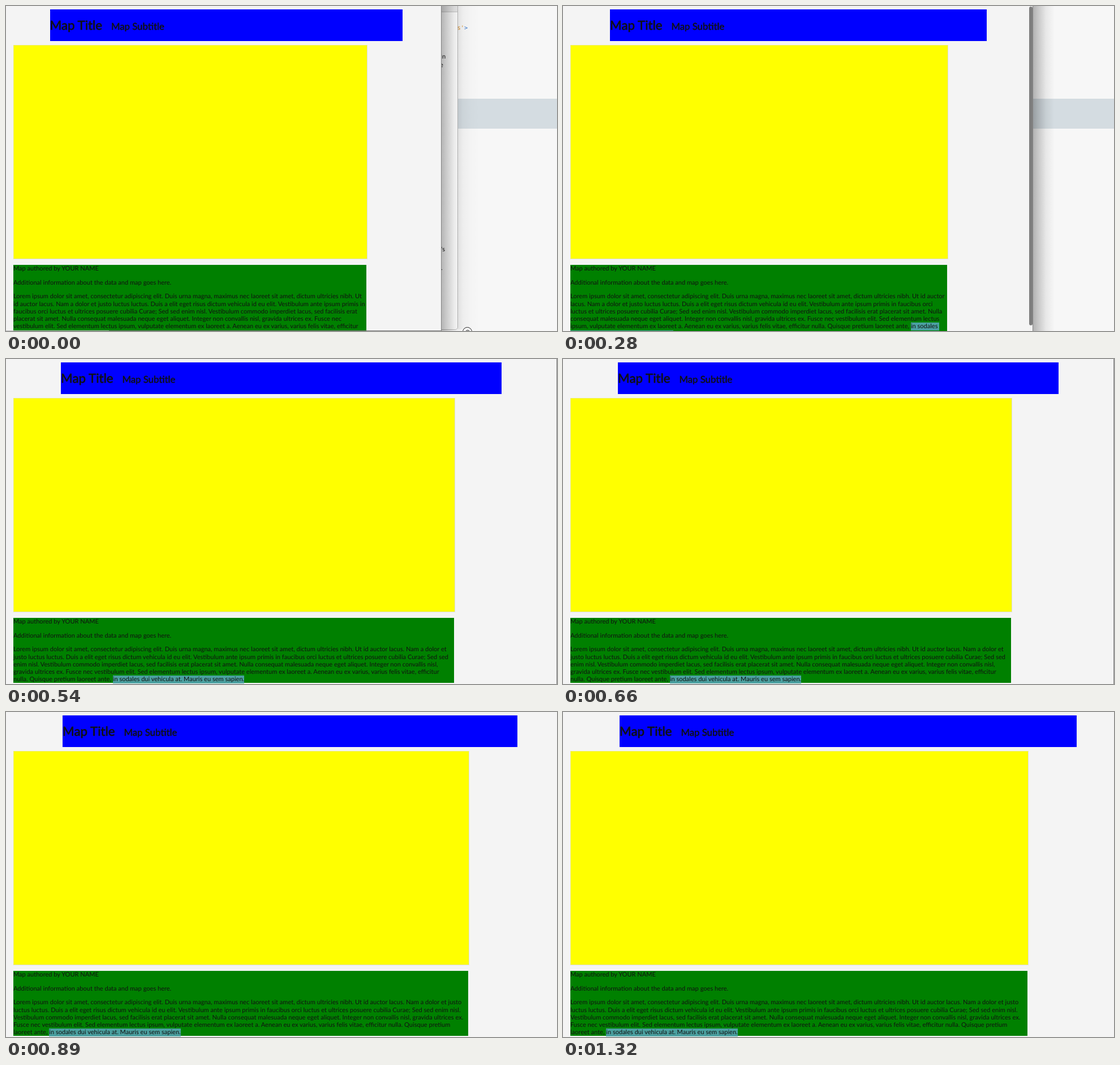
Recreate the animation shown at these times as an HTML page. Size 974x575 px, loop 1500 ms.

```html
<!DOCTYPE html>
<html lang="en">
<head>
<meta charset="utf-8">
<title>Resizing a map page</title>
<style>
html, body { margin: 0; width: 100%; height: 100%; overflow: hidden; }
body { position: relative; background: #f7f7f7; color: #111; font: 11.06px/13.26px Lato, sans-serif; text-rendering: geometricPrecision; }
div { position: absolute; box-sizing: border-box; white-space: pre; }
#stage { left: 0; top: 0; width: 974px; height: 575px; overflow: hidden; }
#row { left: 0; top: 164px; width: 974px; height: 53px; background: #d4dce1; }
#code { left: 797.5px; top: 32px; font: 10.3px/14px "DejaVu Sans Mono", monospace; color: #d98a1c; }
#code b { font-weight: 400; color: #2a6fc9; }
#ring { left: 807px; top: 568px; width: 17px; height: 17px; border: 1.3px solid #222; border-radius: 50%; background: #fff; }
#ring::after { content: ""; position: absolute; left: 4px; top: 4px; width: 6px; height: 6px; border: 1px solid #222; border-radius: 50%; }
.win { left: 0; background: #f4f4f4; border-right: 1px solid #858585; }
.win::after {
  content: ""; position: absolute; left: 100%; top: 0; bottom: 0; width: 38px; margin-left: 1px;
  background: linear-gradient(90deg, #00000047, #0000002b 30%, #00000010 60%, #0000);
}
#back { top: 0; width: 799px; height: 573px; background: #fcfcfc; border-color: #b5b5b5; border-bottom: 1px solid #bbb; border-bottom-right-radius: 5px; }
#back::before { content: ""; position: absolute; left: 0; top: 0; width: 100%; height: 11px; background: #e6e6e6; border-bottom: 1px solid #c4c4c4; box-sizing: border-box; }
#back::after { opacity: .2; }
#back div { line-height: 14px; }
#page { top: 0; height: 575px; }
#bar { right: 0; top: 1px; width: 6px; height: 564px; border-radius: 3px; background: #7e7e7e; }
#head { top: 6px; height: 56px; background: #00f; }
#head div { line-height: 1; -webkit-text-stroke: .029em #111; }
#title { left: 0; top: 17.4px; font-size: 22.34px; }
#sub { left: 108.4px; top: 22.4px; font-size: 16.75px; }
#map { left: 13px; top: 69px; height: 379px; background: #ff0; border: 1px solid #ddd; border-left-color: #eeee66; border-top-color: #eeee66; }
#info { left: 13px; top: 458px; background: green; }
#info div { left: 0; margin-top: .4px; }
#info mark { display: inline-block; height: 13.26px; background: #4aa0a0; color: inherit; }
#foot { left: 0; top: 573.5px; width: 770px; height: 2px; background: linear-gradient(90deg, #bbb 182px, #777 182px); }
</style>
</head>
<body>
<div id="stage">
  <div id="row"></div>
  <div id="code">s'<b>&gt;</b></div>
  <div id="ring"></div>
  <div id="back" class="win">
    <div style="left:768px;top:83px">In</div>
    <div style="left:767px;top:98px">e</div>
    <div style="left:769px;top:424px">'s</div>
    <div style="left:769px;top:457px">.</div>
  </div>
  <div id="page" class="win"><div id="bar"></div></div>
  <div id="head"><div id="title">Map Title</div><div id="sub">Map Subtitle</div></div>
  <div id="map"></div>
  <div id="info"></div>
  <div id="foot"></div>
</div>
<script>
const words = `Lorem ipsum dolor sit amet, consectetur adipiscing elit. Duis urna magna, maximus nec laoreet sit amet, dictum ultricies nibh. Ut id auctor lacus. Nam a dolor et justo luctus luctus. Duis a elit eget risus dictum vehicula id eu elit. Vestibulum ante ipsum primis in faucibus orci luctus et ultrices posuere cubilia Curae; Sed sed enim nisl. Vestibulum commodo imperdiet lacus, sed facilisis erat placerat sit amet. Nulla consequat malesuada neque eget aliquet. Integer non convallis nisl, gravida ultrices ex. Fusce nec vestibulum elit. Sed elementum lectus ipsum, vulputate elementum ex laoreet a. Aenean eu ex varius, varius felis vitae, efficitur nulla. Quisque pretium laoreet ante, in sodales dui vehicula at. Mauris eu sem sapien.`.split(' ');
const marked = words.lastIndexOf('in');
const wide = [28, 57, 80, 104];

// start ms, header left, content width, window edge, word index of each line break
const steps = [
  [0, 77.5, 623.5, 770, [20, 45, 64, 82, 101]],
  [150, 83, 666, 831, [22, 47, 68, 87, 108]],
  [360, 92, 744, 914, [25, 52, 74, 97]],
  [540, 97, 779, 974, [27, 55, 77, 101]],
  [740, 99, 798, 1040, wide],
  [890, 100, 804, 1040, wide],
  [1040, 100, 808, 1040, wide],
];
const loop = 1500, lineH = 13.26, gap = 24.43;
const $ = id => document.getElementById(id);
const put = (id, left, width) => {
  $(id).style.left = left + 'px';
  $(id).style.width = width + 'px';
};
const row = (top, html) => `<div style="top:${top}px">${html}</div>`;

function paragraph(breaks) {
  return [0, ...breaks].map((from, i) => {
    const to = breaks[i] ?? words.length;
    const cut = Math.min(Math.max(from, marked), to);
    const plain = words.slice(from, cut).join(' ');
    let picked = words.slice(cut, to).join(' ');
    if (picked && to < words.length) picked += ' ';
    const space = plain && picked ? ' ' : '';
    return row(2 * gap + i * lineH, plain + space + (picked && `<mark>${picked}</mark>`));
  }).join('');
}

function show([, left, width, edge, breaks], i) {
  put('head', left, width);
  put('map', 13, width + 2.2);
  put('info', 13, width);
  put('page', 0, edge);
  $('info').style.height = (breaks.length > 4 ? 130 : 115) + 'px';
  $('info').innerHTML = row(0, 'Map authored by YOUR NAME')
    + row(gap, 'Additional information about the data and map goes here.')
    + paragraph(breaks);
  $('bar').hidden = i !== 1;
  $('foot').hidden = i !== 0;
}

let current = -1;
function tick() {
  const t = performance.now() % loop;
  const i = steps.findLastIndex(s => s[0] <= t);
  if (i !== current) show(steps[current = i], i);
  requestAnimationFrame(tick);
}
tick();
</script>
</body>
</html>
```
